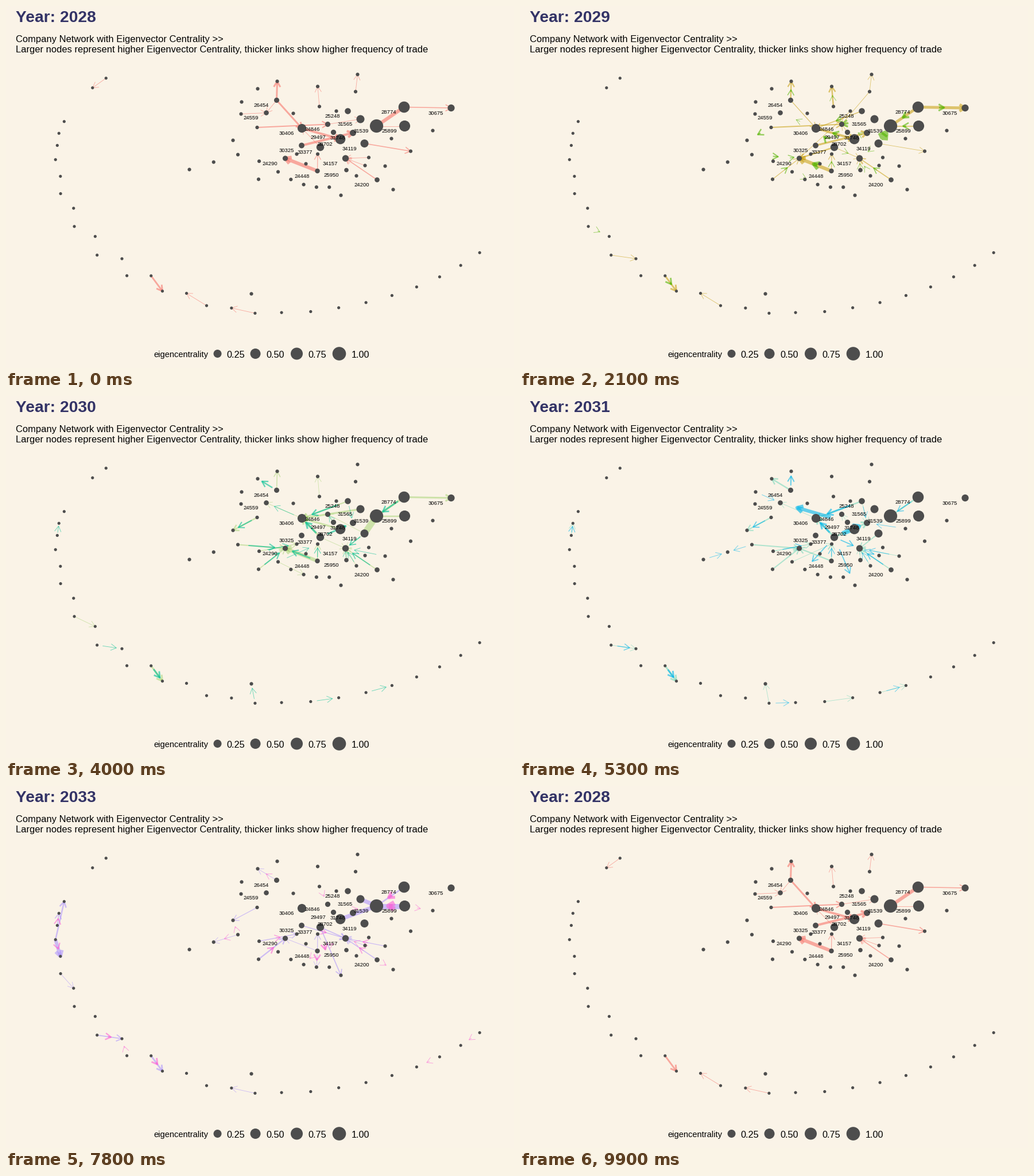
A matplotlib script for the animation above (10 s loop, 885x632 px).

```python
from itertools import product

import numpy as np
import matplotlib.pyplot as plt
from matplotlib.animation import FuncAnimation
from matplotlib.collections import EllipseCollection, LineCollection

W, H, DPI = 885, 632, 100
PT = 72 / DPI                      # points per pixel
BG, INK, NAVY = "#FAF3E7", "#4D4D4D", "#333366"
ALPHA, HEAD, THIN = 0.6, 11.3, 0.85
FIRST = 2028
COLORS = ["#F8766D", "#C49A00", "#53B400", "#00C094",
          "#00B6EB", "#A58AFF", "#FB61D7"]

# (first frame, steps) of each change of year
MOVES = [(6, 9), (21, 9), (36, 9), (50, 8), (64, 8), (78, 8), (92, 8)]

# company: x, y, radius
HUBS = {
    26454: (471, 164, 4.5), 24559: (453, 186, 4.3), 30406: (515, 213, 7.6),
    24846: (560, 206, 4.6), 25248: (595, 183, 5.3), 31565: (617, 197, 7),
    31539: (645, 209, 11.6), 29497: (570, 220, 4.6), 31748: (604, 221, 5.5),
    28702: (582, 232, 8.8), 33377: (547, 246, 6.7), 30325: (514.5, 243, 4.9),
    24290: (486, 265.5, 4.6), 24448: (542, 287.5, 4.2),
    25950: (592.5, 286, 3.8), 34157: (591, 265.5, 5.7),
    24200: (646, 303, 4.3), 34119: (624, 239.5, 7), 25899: (694, 209, 9.6),
    28774: (693, 176, 9.8), 30675: (775, 177.5, 6.1),
}


def ring():
    """Outer companies: an uneven ellipse with a zigzag on its left side."""
    i = np.arange(29)
    dip = np.exp(-((i - 13) / 3) ** 2)
    zigzag = -0.035 * (-1.0) ** i * np.exp(-((i - 16) / 5) ** 2)
    angle = np.radians(38.5 + 6.04 * i + 3 * dip + 12.5 * (i > 26))
    c, s = np.cos(angle), np.sin(angle)
    r = 1.005 + zigzag - 0.03 * dip
    return np.column_stack([455 + r * c * np.where(c > 0, 470, 366),
                            255 + r * s * np.where(s > 0, 280, 200)])


k = np.arange(5)
tail = np.linspace((319, 285), (403.5, 259), 3)
arc = np.column_stack([473.5 + 22.3 * k, 289 + 15.5 * k - 2.2 * k ** 2])
loose = [
    (427, 502), (395, 234), (472, 131), (438, 144), (410, 167), (409, 188),
    (500, 187), (437, 211.5), (542.5, 140), (545.5, 175), (575, 183),
    (506, 258), (440.5, 270.5), (439.5, 302), (583, 330), (522, 275),
    (542.5, 258), (610, 296), (674, 320), (660, 279), (625, 278),
    (631.5, 264), (671, 231), (704.5, 253), (743, 217), (612, 119),
    (608.5, 149),
]
outer = ring()
small = np.vstack([outer, tail, arc, loose])
place = dict(enumerate(small))
place.update({hub: np.array(v[:2]) for hub, v in HUBS.items()})

links = [[] for _ in COLORS]


def trade(first, last, width, sources, targets):
    """Link every source to every target; width runs from first to last."""
    span = range(first - FIRST, last - FIRST + 1)
    widths = np.linspace(*np.broadcast_to(width, 2), len(span))
    for a, b in product(np.atleast_1d(sources), np.atleast_1d(targets)):
        for year, w in zip(span, widths):
            links[year].append((place[a], place[b], w))


# around the ring
trade(2028, 2034, 2.9, 14, 13)
trade(2028, 2029, THIN, 11, 12)
trade(2031, 2034, (THIN, 2.3), 17, 16)
trade(2031, 2034, (THIN, 1.8), 24, 25)
trade(2031, 2032, THIN, 5, 4)
trade(2033, 2034, (6, 2), 23, 22)
trade(2033, 2033, 2.5, 23, 26)
trade(2032, 2034, THIN, 31, 30)

# the strongest partners in the east
trade(2028, 2032, (6, 1.5), 28774, 31539)
trade(2033, 2034, (2.5, 5), 28774, 31539)
trade(2028, 2030, (THIN, 2.5), 25899, 31539)
trade(2033, 2034, 9, 25899, 31539)
trade(2030, 2030, 11, 34119, 31539)
trade(2033, 2033, 7, [28702, 31565], 31539)
trade(2028, 2028, 1.6, 28774, 30675)
trade(2029, 2030, (5, 3), 28774, 30675)
trade(2028, 2029, (1.6, THIN), 34119, 60)

# north and middle
trade(2028, 2030, (3, 1.5), 26454, 39)
trade(2032, 2032, 2, 26454, 39)
trade(2028, 2029, (3, 1.2), 26454, 30406)
trade(2031, 2031, 2.4, 26454, 40)
trade(2033, 2034, THIN, 26454, 40)
trade(2029, 2029, 2.5, 46, 45)
trade(2028, 2029, THIN, 63, 62)
trade(2028, 2029, 2, 44, 24846)
trade(2030, 2033, (2.4, 1.2), 44, 38)
trade(2028, 2029, 4, 30406, 28702)
trade(2028, 2029, (4, 3.2), 30325, 31748)
trade(2030, 2030, 3.2, [31565, 28702], 30406)
trade(2029, 2032, (1.5, 3), 25248, 30406)
trade(2030, 2032, 3.2, 33377, 30406)
trade(2030, 2031, THIN, 30406, 24559)
trade(2031, 2032, (3, 8), 33377, 31748)
trade(2031, 2032, THIN, 25248, 31748)
trade(2032, 2032, 6, 29497, 24559)

# fans into 24290 and 34157, fans out of 33377 and 24448
trade(2028, 2030, 6, 24448, 24290)
trade(2031, 2031, 2.2, 24448, 24290)
trade(2029, 2029, 2.4, 33377, 24290)
trade(2029, 2031, (1.2, 2), 50, 24290)
trade(2033, 2034, 2.2, 50, 24290)
trade(2030, 2031, 2, 31, 24290)
trade(2030, 2034, 1.4, 49, 48)
trade(2028, 2034, 1.6, 24200, 34157)
trade(2031, 2034, (THIN, 1.4), 56, 34157)
trade(2032, 2034, THIN, 57, 34157)
trade(2029, 2031, THIN, 25950, 34157)
trade(2030, 2032, THIN, 54, 34157)
trade(2030, 2031, (THIN, 1.8), 34119, 34157)
trade(2029, 2030, THIN, 33377, 34157)
trade(2032, 2033, 1.7, 33377, [34157, 51])
trade(2032, 2032, 1.7, 33377, 33)
trade(2033, 2034, 1.4, 30325, 34157)
trade(2028, 2033, 1.2, 24448, 53)
trade(2033, 2034, (THIN, 2.6), 24448, 35)
trade(2034, 2034, 2.6, 33377, 36)

# faint links of a single year
ONCE = {
    2028: [(28, 27), (9, 10), (26454, 24559), (42, 24559), (46, 45),
           (33377, 30406), (24846, 31565), (58, 34157), (57, 34157)],
    2029: [(17, 16), (63, 24846), (47, 24290), (29497, 24846)],
    2030: [(19, 18), (46, 45), (34119, 24846), (32, 34)],
    2031: [(9, 37), (7, 6), (32, 53), (29497, 24846)],
    2032: [(9, 8), (29, 30), (41, 24559), (59, 31748)],
    2033: [(9, 10), (21, 20), (24448, 24290)],
    2034: [(15, 16), (2, 3), (0, 1), (31, 38), (46, 24846), (29497, 31539),
           (25899, 61), (24448, 34157), (24448, 34), (24200, 55)],
}
for year, pairs in ONCE.items():
    for pair in pairs:
        trade(year, year, THIN, *pair)


def strokes(start, end, size):
    """Shafts scaled about their middle, plus open heads of fixed length."""
    mid, half = (start + end) / 2, (end - start) / 2
    butt, tip = mid - half * size, mid + half * size
    back = np.arctan2(-half[:, 1], -half[:, 0])
    arms = [tip + HEAD * np.column_stack([np.cos(back + a), np.sin(back + a)])
            for a in (-np.pi / 6, np.pi / 6)]
    return (list(np.stack([butt, tip], axis=1))
            + list(np.stack([arms[0], tip, arms[1]], axis=1)))


def show(layer, year, size, alpha):
    start, end, width = map(np.array, zip(*links[year]))
    layer.set_segments(strokes(start, end, size))
    layer.set_linewidths(np.tile(width * PT, 2))
    layer.set_color(COLORS[year])
    layer.set_alpha(alpha)


plt.rcParams["font.family"] = "Liberation Sans"
fig = plt.figure(figsize=(W / DPI, H / DPI), dpi=DPI, facecolor=BG)
ax = fig.add_axes([0, 0, 1, 1])
ax.set_xlim(-0.5, W - 0.5)
ax.set_ylim(H - 0.5, -0.5)
ax.axis("off")


def write(x, y, text, px, **style):
    return ax.text(x, y, text, fontsize=px * PT, va="baseline", zorder=4,
                   **style)


def dots(xy, radius):
    d = np.broadcast_to(2.0 * np.asarray(radius), len(xy))
    ax.add_collection(EllipseCollection(
        d, d, 0 * d, units="xy", offsets=xy, transOffset=ax.transData,
        facecolors=INK, edgecolors="none", zorder=3), autolim=False)


def line_layer(z):
    layer = LineCollection([], capstyle="butt", joinstyle="round", zorder=z)
    return ax.add_collection(layer, autolim=False)


fading, growing = line_layer(1), line_layer(2)
dots(outer, 2.6)
dots(small[len(outer):], 3.1)
for hub, (x, y, r) in HUBS.items():
    dots([(x, y)], r)
    write(x - 26.5, y + 11.5, str(hub), 9.5, ha="center")

title = write(16.5, 28, "", 28.2, color=NAVY, weight="bold")
write(16.5, 63, "Company Network with Eigenvector Centrality >>", 16.48)
write(16.5, 81, "Larger nodes represent higher Eigenvector Centrality, "
                "thicker links show higher frequency of trade", 16.48)
write(256.5, 612.5, "eigencentrality", 14.6)
for level, x, gap in [(0.25, 368, 15.5), (0.5, 434, 18.5),
                      (0.75, 506, 19.5), (1, 580, 21.5)]:
    dots([(x, 606.5)], 2.2 + 9.6 * np.sqrt(level))
    write(x + gap, 613, f"{level:.2f}", 16.3)


def update(frame):
    old, new, step, steps = 6, 0, 1, 1
    for i, (first, n) in enumerate(MOVES):
        if frame >= first:
            old, new = i, (i + 1) % len(COLORS)
            step, steps = min(frame - first + 1, n), n
    p = step / steps
    show(fading, old, 1, ALPHA * (1 - p))
    show(growing, new, p, ALPHA)
    fading.set_visible(p < 1)
    late = step == steps or step - 1 >= steps / 2
    title.set_text(f"Year: {FIRST + (new if late else old)}")
    return fading, growing, title


anim = FuncAnimation(fig, update, frames=100, interval=100, repeat=True,
                     repeat_delay=0, blit=False)
plt.show()
```
